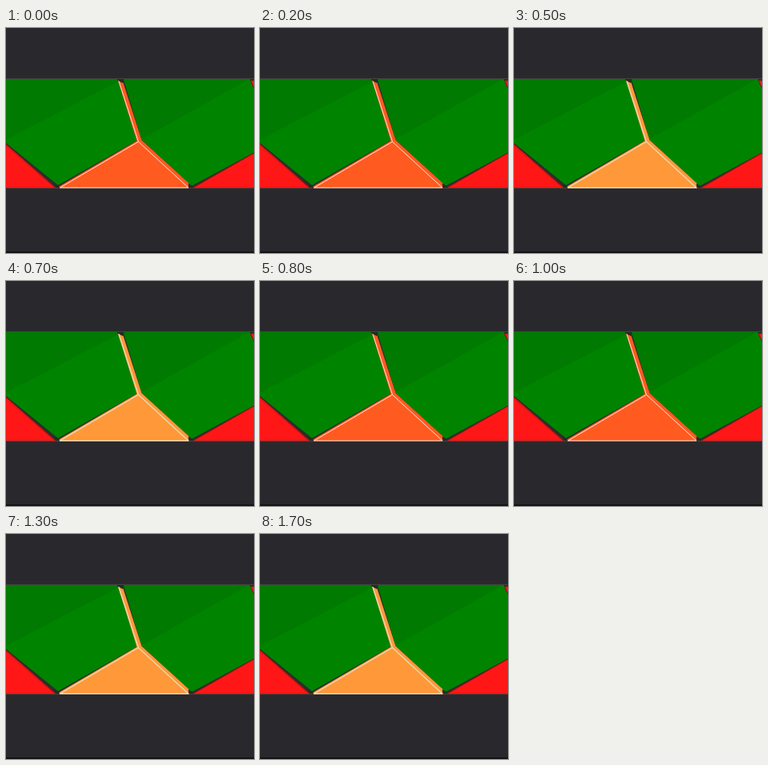
Animation of 310 by 282 pixels, one loop 1.8 s. Source, as an HTML page:

```html
<!DOCTYPE html>
<html lang="en">
<head>
<meta charset="utf-8">
<title>Blinking mesh</title>
<style>
html, body { margin: 0; width: 100%; height: 100%; overflow: hidden; background: #29292d; }
svg { display: block; width: 100vw; height: 100vh; }
</style>
</head>
<body>
<svg viewBox="0 0 310 282">
  <rect width="310" height="282" fill="#29292d"/>
  <rect y="280" width="310" height="2" fill="#131315"/>
  <rect y="64" width="310" height="136.5" fill="#26302a"/>

  <g fill="#008400">
    <path d="M0 64H139.5L163.5 141L65 197L0 144Z"/>
    <path d="M147 64H304.5L310 76V156L232 198L169.5 140Z"/>
  </g>
  <g fill="#007a00">
    <path d="M0 64H139.5L140.5 67L0 140Z"/>
    <path d="M147 64H304L170 139Z"/>
  </g>

  <g fill="#ff1717">
    <path d="M0 146L62 200.5H0Z"/>
    <path d="M234 200.5L310 157V200.5Z"/>
    <path d="M306 66H310V75Z"/>
  </g>
  <g fill="none" stroke="#901010">
    <path d="M0 145.5L62 199.5M234 199.5L310 156.5M305.5 66L310 75.5"/>
    <path id="dots" d="M0 148L61 200.5" stroke="#b41212" stroke-dasharray="1.5 1.5"/>
  </g>

  <g id="face">
    <path d="M140 66L146.5 68.5L169.5 140.5L228.5 194.5V200.5H66.5V198.5L163.5 141.5Z"/>
  </g>
  <path d="M138.5 64H147.5L146 69L140.5 66ZM61 196L66 197.5L67 201H62.5ZM228 195L233.5 198L234 201H228.5Z" fill="#242a27"/>

  <path d="M0 63.5H310" stroke="#40463f"/>
  <path d="M0 200.7H310" stroke="#70403b" stroke-width=".8"/>
  <g id="wire" fill="none" stroke-linejoin="round">
    <path d="M141 66.5L165.5 142.5L228 200.2H67.5L165.5 142.5"/>
  </g>
</svg>
<script>
const $ = id => document.getElementById(id);
const STEP = 100, LOOP = 1800;
const looks = [
  { face: '#ff5a20', wire: '#ffe6d6', width: 1 },
  { face: '#ff9838', wire: '#e6d8b4', width: 1.4 }
];

function draw(ms) {
  const step = Math.floor((ms % LOOP) / STEP);
  const look = looks[step % 2];
  $('face').setAttribute('fill', look.face);
  $('wire').setAttribute('stroke', look.wire);
  $('wire').setAttribute('stroke-width', look.width);
  $('dots').setAttribute('stroke-dashoffset', step % 3);
}

const start = performance.now();
function tick() {
  draw(performance.now() - start);
  requestAnimationFrame(tick);
}
draw(0);
requestAnimationFrame(tick);
</script>
</body>
</html>
```
